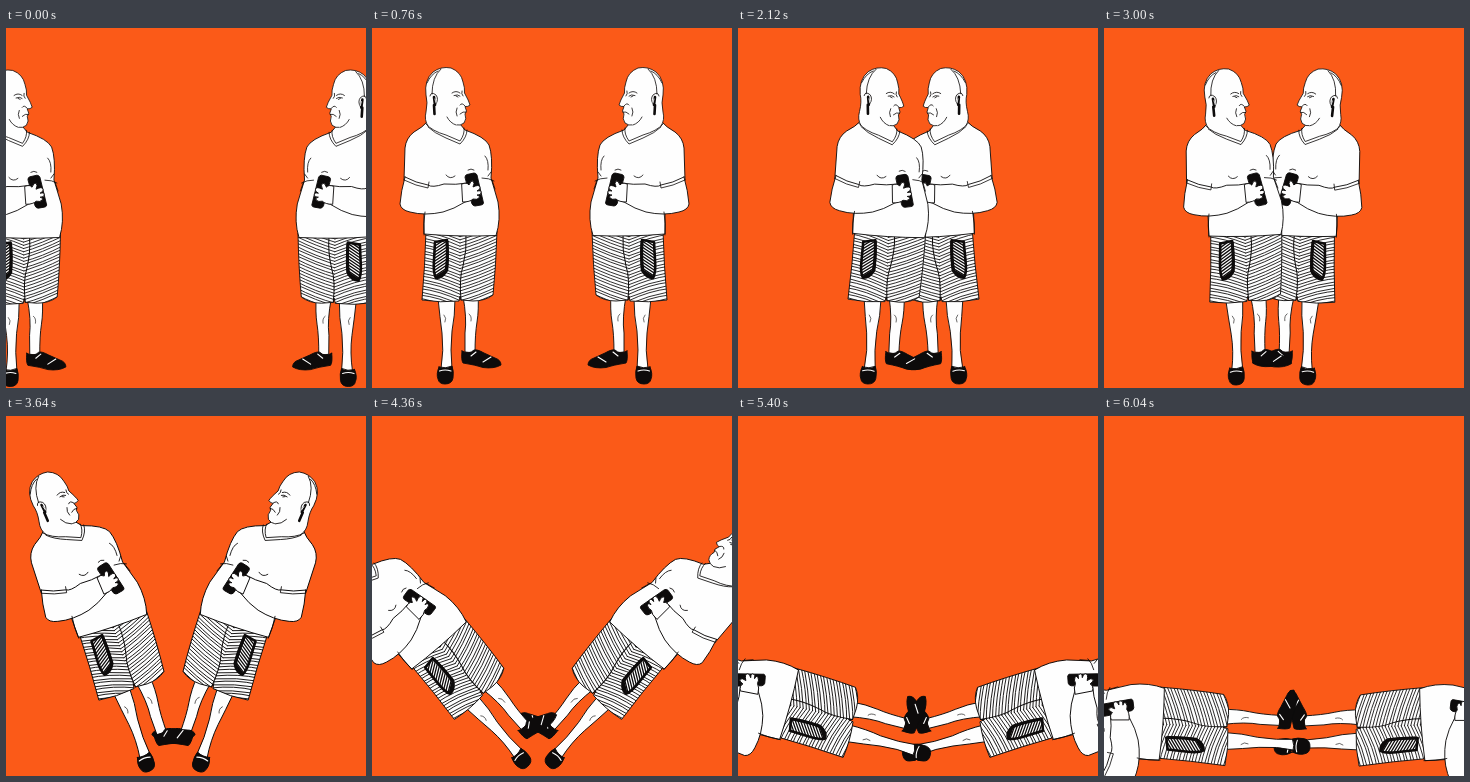
Recreate the animation shown at these times as an HTML page with a canvas. Size 360 by 360 pixels, loop 6.12 s.

```html
<!DOCTYPE html>
<html lang="en">
<head>
<meta charset="utf-8">
<title>Two men with phones</title>
<style>
html, body { margin: 0; width: 100%; height: 100%; overflow: hidden; background: #fb5a18; }
canvas { display: block; width: 360px; height: 360px; }
</style>
</head>
<body>
<canvas id="stage" width="360" height="360"></canvas>
<script>
const ctx = document.getElementById('stage').getContext('2d');
const LOOP = 6120, STEP = 80, LEAD = 40;
const INK = '#0d0b0b', PAPER = '#fefefe', GROUND = '#fb5a18';
const PIVOT = [73, 346];

// time, foot x, foot y, lean in degrees (positive leans toward the other man)
const LEFT = [
  [0, 4, 348.5, -.6], [600, 58, 346, 0], [760, 73, 346, 0], [1240, 95, 346, 0],
  [1880, 128, 346, 0], [2040, 130, 346, 0], [2119, 130, 346, 0], [2120, 130, 346, 2.3],
  [3000, 132, 347, -2.5], [3320, 135, 347, -10.5], [3960, 144, 345, -29],
  [4360, 149, 343, -42], [5400, 182.5, 337, -76], [6040, 196, 330.5, -87]
];
const RIGHT = [
  [0, 342.5, 348.5, -.6], [600, 288, 346, 0], [760, 272, 346, 0], [1240, 255, 346, 0],
  [1880, 229, 346, 0], [2119, 229, 346, 0], [2120, 221, 346, 2.3],
  [3000, 204, 347, -3], [3320, 201, 347, -10.5], [3960, 190, 345, -29],
  [4360, 183, 343, -42], [5400, 174.5, 337, -76], [6040, 180, 331, -87]
];

const P = d => new Path2D(d);
const shape = {
  backLeg: P('M91 268 Q95 290 93 305 L93 324 L103 325 Q103 306 105 294 Q107 282 106 266Z'),
  frontLeg: P('M66 270 Q68 290 70 305 Q72 322 69 341 L80 341 Q78 322 80 303 Q83 288 83 270Z'),
  backShoe: P('M90 323 Q89 332 91 335 Q104 337 111 339.5 Q122 341 129 337 Q129 332 123 330 L112 325 Q105 321 102 322 Q97 327 90 323Z'),
  frontShoe: P('M67 339 Q64 346 66 351 Q67 356 73 356 Q80 356 81 350 Q82 343 80 338 Q74 341 67 339Z'),
  shorts: P('M54 203 L125 203 Q124 238 121 267 Q113 273 101 273 L89 272 L88 268 L87 273 Q68 275 50 272 Q53 238 54 203Z'),
  pocket: P('M63 214 L75 212 Q76 230 75 242 Q71 250 64 250 Q61 245 62 232Z'),
  body: P('M55 94 Q51 99 42 104 Q34 110 33 120 L32 152 L52 184 L52 206 Q86 209 124 207.5 Q129 192 126 174 Q122 160 119 150 Q121 128 117 117 Q113 109 93 102 L88 96Z'),
  arm: P('M33 149 Q44 155 56 157 Q60 160 72 156 Q84 157 95 155 L104 164 Q100 173 93 174 Q82 181 71 184 Q53 188 38 184 Q29 182 28 176 Q29 163 33 149Z'),
  phone: P('M93 149 Q93 147 95 146.500 L102 145 Q104 145 105 147 L111.500 175 Q111 177 109 177 L103 178 Q101 178 100 176Z'),
  hand: P('M90 156 Q95 154 97 157 Q99 152 101 153 Q103 155 101 159 Q107 156 108 159 Q109 161 105 163 Q110 162 109 165 Q109 167 105 167 Q109 168 107 170 Q105 172 101 171 Q98 174 91 174Z'),
  head: P('M56 98 Q52 92 54 84 Q56 74 54 67 Q52 52 61 44 Q69 38 79 40 Q89 44 91 54 Q93 60 92.500 65 Q97 73 98 77 Q96 79 93 78.500 L94.500 83 L93 86 Q95 91 92 95 Q88 98 85 97 L89 101 L88 110 L75 107Z')
};

const detail = {
  face: P('M80 65 Q84 62 88 65 M82 67.500 Q86 66 88 68 M84 68 L86 69 M90 63 Q89 66 91 68 M88 77 Q90 74 93 78 M88 86 Q91 83 94 84 M85 80 Q83 84 85 88 M84 97 Q78 95 75 89'),
  hair: P('M69 41 Q60 49 60 66 M55 55 Q59 46 66 43 M58 68 Q59 63 64 67 Q67 71 64 76'),
  collar: P('M54 96 Q60 103 74 107 L88 113 Q93 106 92 100 M56 99 Q62 105 74 110 L88 116 Q95 109 95 102'),
  chest: P('M74 147 Q78 152 83 148 M116 148 L119 144 M113 128 Q117 132 116 142 M96 142 Q99 140 102 142'),
  sleeve: P('M32 152 Q44 158 56 160 L57 154 M53 184 Q51 196 52 207 M110 150 Q117 150 122 153 M120 152 L123 161'),
  knees: P('M72 287 Q75 290 73 294 M97 286 Q100 288 99 293'),
  straps: P('M99 328 L104 324 M111 334 L119 329 M67.500 343 Q73 341 79 343')
};

function paint(path, fill = PAPER, width = .9) {
  ctx.fillStyle = fill;
  ctx.fill(path);
  pen(path, width);
}

function pen(path, width = .8, color = INK) {
  ctx.lineWidth = width;
  ctx.strokeStyle = color;
  ctx.stroke(path);
}

function clipped(path, draw) {
  ctx.save();
  ctx.clip(path);
  draw();
  ctx.restore();
}

const weave = new Path2D();
for (let y = 190; y < 290; y += 3.2) {
  const wave = Math.sin(y * .9) * .7;
  weave.moveTo(48, y - 3);
  weave.quadraticCurveTo(68, y + wave, 88, y + 9);
  weave.moveTo(88, y + 9);
  weave.quadraticCurveTo(106, y + 4 - wave, 127, y - 6);
}
const pocketLines = new Path2D();
for (let y = 200; y < 256; y += 3) {
  pocketLines.moveTo(60, y + 8);
  pocketLines.lineTo(78, y - 4);
}

function drawMan() {
  paint(shape.backLeg);
  paint(shape.frontLeg);
  pen(detail.knees, .6);
  paint(shape.backShoe, INK);
  paint(shape.frontShoe, INK);
  pen(detail.straps, 1.1, PAPER);

  paint(shape.shorts);
  clipped(shape.shorts, () => pen(weave, .85));
  pen(P('M89 272 Q87 250 91 238 Q95 222 94 207'), 1);
  paint(shape.pocket, PAPER, 2.6);
  clipped(shape.pocket, () => pen(pocketLines, 1.3));
  pen(P('M75 214 Q76 232 74 243 L65 249'), 3);

  paint(shape.body);
  pen(detail.chest);
  paint(shape.arm);
  pen(detail.sleeve);
  paint(shape.phone, INK);
  paint(shape.hand);

  ctx.fillStyle = PAPER;
  ctx.fill(shape.head);
  pen(P('M56 98 Q52 92 54 84 Q56 74 54 67 Q52 52 61 44 Q69 38 79 40 Q89 44 91 54 Q93 60 92.500 65 Q97 73 98 77 Q96 79 93 78.500 L94.500 83 L93 86 Q95 91 92 95 Q88 98 85 97'));
  pen(detail.face);
  pen(detail.hair);
  pen(detail.collar);
  pen(P('M62 69 L63 77 M62 77 L62.500 86'), 2.6);
  pen(P('M63 71 L64 75'), .8, PAPER);
}

function pose(keys, t) {
  let i = 0;
  while (i < keys.length - 2 && t >= keys[i + 1][0]) i++;
  const a = keys[i], b = keys[i + 1];
  const k = (t - a[0]) / (b[0] - a[0]);
  return a.map((v, n) => v + (b[n] - v) * k);
}

function place(keys, t, side) {
  const [, x, y, lean] = pose(keys, t);
  ctx.save();
  ctx.translate(x, y);
  ctx.scale(side, 1);
  ctx.rotate(lean * Math.PI / 180);
  ctx.translate(-PIVOT[0], -PIVOT[1]);
  drawMan();
  ctx.restore();
}

ctx.lineCap = ctx.lineJoin = 'round';
const start = performance.now();

function tick() {
  const t = (performance.now() - start) % LOOP;
  const held = t < LEAD ? 0 : LEAD + Math.floor((t - LEAD) / STEP) * STEP;
  ctx.fillStyle = GROUND;
  ctx.fillRect(0, 0, 360, 360);
  place(RIGHT, held, -1);
  place(LEFT, held, 1);
  requestAnimationFrame(tick);
}
tick();
</script>
</body>
</html>
```
